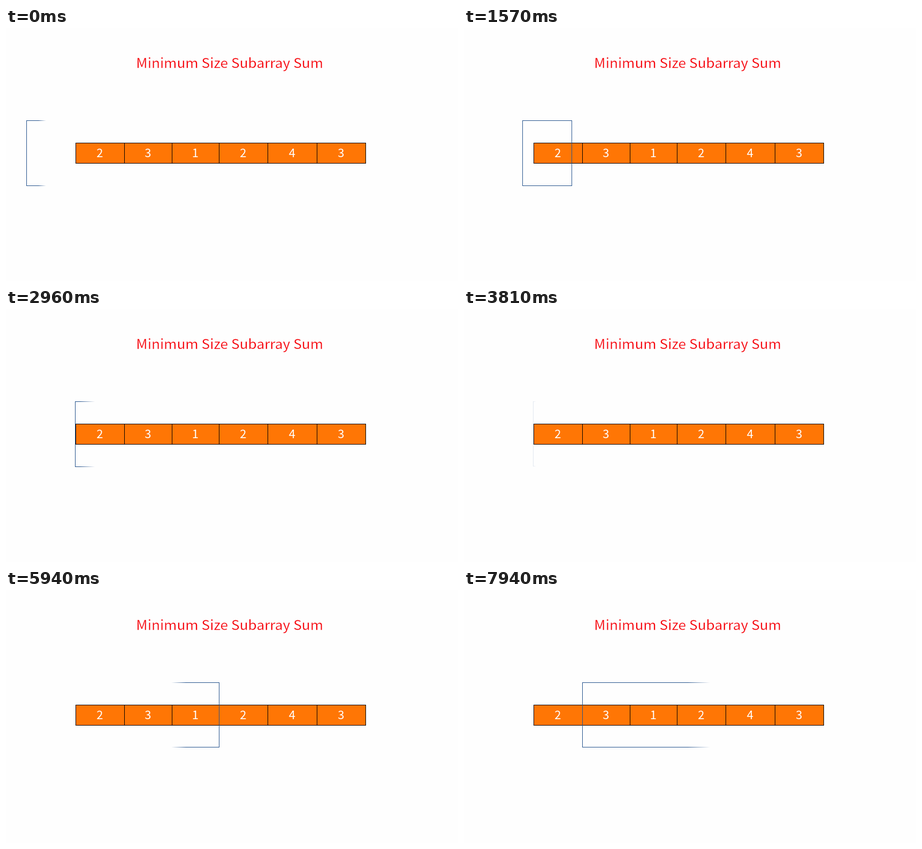
An HTML page for the animation above (8 s loop, 845x474 px).

```html
<!DOCTYPE html>
<html lang="en">
<head>
<meta charset="utf-8">
<title>Minimum Size Subarray Sum</title>
<style>
  html, body { margin: 0; width: 100%; height: 100%; overflow: hidden; background: #fefefe; }
  svg { display: block; width: 100%; height: 100%; }
  text { font-family: "Noto Sans CJK SC", "Noto Sans CJK", "Noto Sans CJK JP", "Open Sans", sans-serif; text-anchor: middle; }
</style>
</head>
<body>
<svg viewBox="0 0 845 474">
  <defs>
    <linearGradient id="wipe" gradientUnits="userSpaceOnUse" y1="0" y2="0">
      <stop offset="0" stop-color="#24528c"/>
      <stop offset="1" stop-color="#24528c" stop-opacity="0"/>
    </linearGradient>
  </defs>
  <rect width="845" height="474" fill="#fefefe"/>
  <text x="418.2" y="75" font-size="26.25" fill="#f60008" stroke="#fefefe" stroke-width="0.3">Minimum Size Subarray Sum</text>
  <g id="cells"></g>
  <rect id="frame" fill="none" stroke="url(#wipe)"/>
</svg>
<script>
const LOOP = 8000, TOP = 173.5, SOFT = 0.155;
const $ = id => document.getElementById(id);
const frame = $('frame'), grad = $('wipe');

function set(el, attrs) {
  for (const k in attrs) el.setAttribute(k, attrs[k]);
  return el;
}

function add(tag, attrs, text = '') {
  const el = set(document.createElementNS('http://www.w3.org/2000/svg', tag), attrs);
  el.textContent = text;
  $('cells').appendChild(el);
}

const edges = [130.5, 221.5, 310.5, 398.5, 489.5, 581.5, 672.5];
[2, 3, 1, 2, 4, 3].forEach((n, i) => {
  const x = edges[i], w = edges[i + 1] - x;
  add('rect', { x, y: 215.5, width: w, height: 38, fill: '#ff7605', stroke: '#000' });
  add('text', { x: x + w / 2 - 0.7, y: 242, 'font-size': 22, fill: '#fff' }, n);
});

// The first step that has not ended is shown; before its start it holds its first pose.
const steps = [
  { start: -170, end: 330, left: 38.5, right: 130.5, bottom: 295.5, kind: 'in' },
  { start: 430, end: 2165, left: 38.5, right: 130.5, bottom: 295.5, kind: 'move', dx: 91.5 },
  { start: 2225, end: 2785, left: 130, right: 222, bottom: 295.5, kind: 'out' },
  { start: 2785, end: 3785, left: 129.5, right: 310.5, bottom: 295.5, kind: 'in' },
  { start: 3785, end: 5285, left: 129.5, right: 398.5, bottom: 294.5, kind: 'in' },
  { start: 5285, end: 6785, left: 221.5, right: 398.5, bottom: 294.5, kind: 'inRight' },
  { start: 6785, end: 8285, left: 221.5, right: 489.5, bottom: 294.5, kind: 'in' }
];

const smooth = u => u * u * u * (10 - 15 * u + 6 * u * u);

function draw(t) {
  const s = steps.find(s => t < s.end);
  const p = Math.max(0, (t - s.start) / (s.end - s.start));
  const width = s.right - s.left, soft = width * SOFT;
  const lead = (width + soft) * p;
  let x = s.left, solid = 2000, clear = 2001;

  if (s.kind === 'move') {
    x += s.dx * smooth(p);
  } else if (s.kind === 'in') {
    clear = x + lead;
    solid = clear - soft;
  } else if (s.kind === 'inRight') {
    clear = s.right - lead;
    solid = clear + soft;
  } else {
    solid = x + lead;
    clear = solid - soft;
  }

  set(grad, { x1: solid, x2: clear });
  set(frame, { x, y: TOP, width, height: s.bottom - TOP });
}

const origin = performance.now();
function tick() {
  draw((performance.now() - origin) % LOOP);
  requestAnimationFrame(tick);
}
tick();
</script>
</body>
</html>
```
